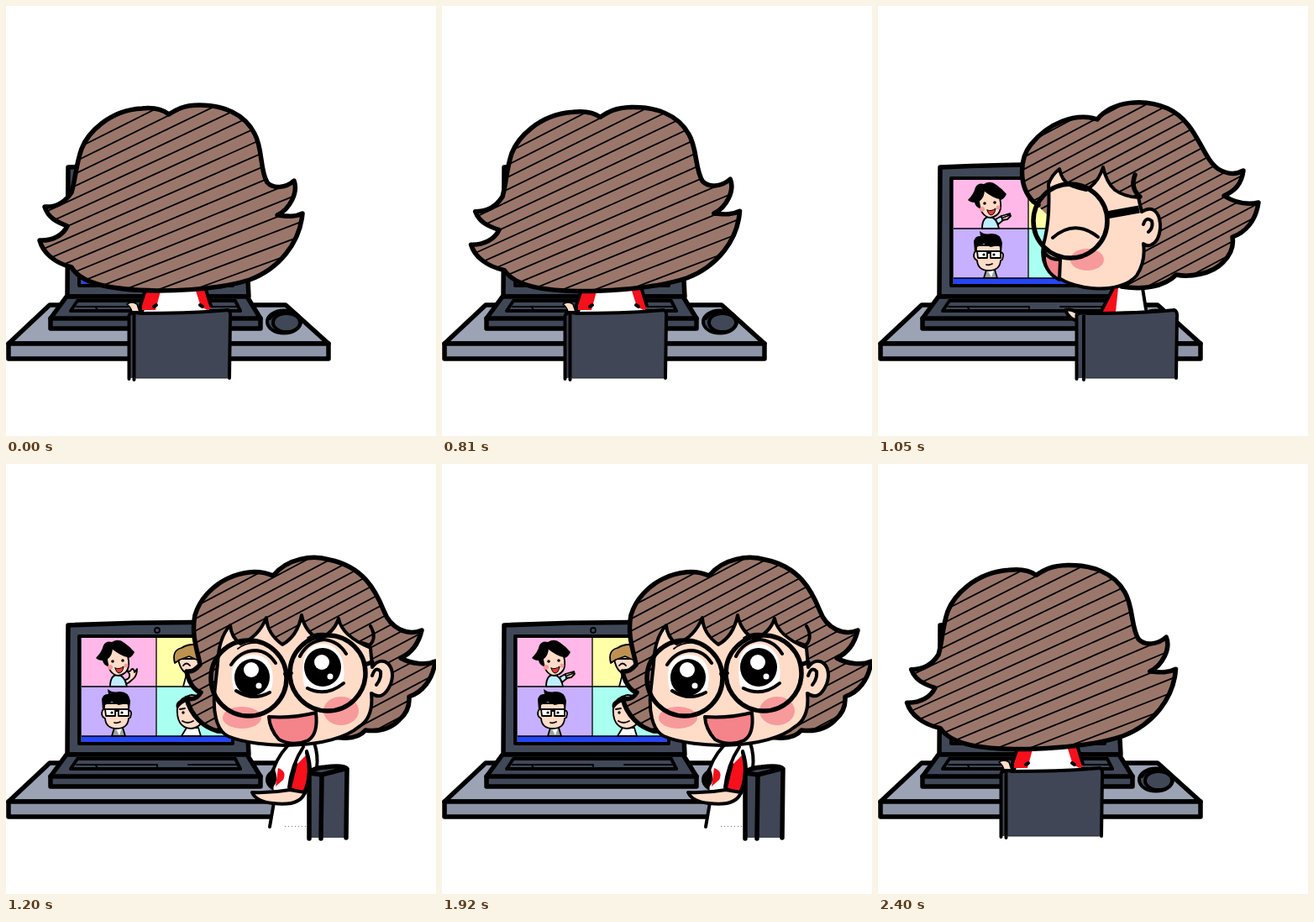
Recreate the animation shown at these times as an HTML page. Size 512 by 512 pixels, loop 2.49 s.

```html
<!DOCTYPE html>
<html lang="en">
<head>
<meta charset="utf-8">
<title>Video call</title>
<style>
html, body { margin: 0; width: 100%; height: 100%; overflow: hidden; background: #fff; }
svg { display: block; width: 100vw; height: 100vh; }
.ink { stroke: #000; stroke-width: 5.5; stroke-linejoin: round; stroke-linecap: round; }
.mid { stroke-width: 4; }
.thin { stroke-width: 1.8; }
.none { fill: none; }
.dark { fill: #404656; }
.steel { fill: #404858; }
.skin { fill: #ffdcc8; }
.hair { fill: #9b776b; }
.white { fill: #fff; }
.red { fill: #f5101c; }
.blush { fill: #f79a9c; }
.lips { fill: #f5848a; }
</style>
</head>
<body>
<svg viewBox="0 0 512 512" xmlns="http://www.w3.org/2000/svg">
<defs>
  <path id="backHair" d="M194 129C185 122 172 121 162 122C122 124 97 152 90 170C83 190 83 205 78 222C70 234 60 240 46 239C50 252 60 257 73 262C68 273 55 280 40 279C44 294 58 306 78 311C88 328 115 338 180 339C230 339 268 333 290 326C325 313 350 282 353 247C343 252 333 250 323 249C338 242 348 222 343 208C333 217 318 218 311 210C302 195 306 170 296 152C284 128 258 118 230 118C212 118 203 123 194 129Z"/>
  <path id="sideHair" d="M261 135C235 126 202 140 182 165C168 182 167 215 185 233L203 250L290 334C315 338 340 335 355 320C370 323 397 320 411 305C420 296 424 286 422 275C437 270 450 256 453 234C440 237 425 234 412 226C425 220 433 212 435 196C426 201 415 200 405 194C385 180 380 138 345 122C318 110 280 112 261 135Z"/>
  <path id="frontHair" d="M318 133C285 118 236 142 225 180C220 205 229 225 231 239C226 245 221 248 215 247C218 262 225 270 232 272C228 279 222 281 215 279C220 300 236 314 252 318L400 326C412 327 422 324 428 317C444 319 458 315 468 305C475 299 481 290 480 277C495 272 508 258 511 235C500 240 482 238 470 231C483 225 491 215 495 198C478 205 458 196 450 175C440 150 425 122 385 114C365 108 335 112 318 133Z"/>
</defs>

<!-- desk -->
<g class="ink">
  <path d="M52 356H333L384 402H3Z" fill="#9ba3b4"/>
  <path d="M3 402H384V420H3Z" fill="#8c94a6"/>
</g>

<!-- laptop -->
<g class="ink steel">
  <path d="M74 192Q178 187 281 189L289 346H73Z"/>
  <path d="M72 346H287L303 372V384H53V372Z"/>
  <path class="none" d="M53 372H303"/>
  <path class="mid" d="M85 351H273L279 363H77Z"/>
  <path class="thin" d="M107 359L110 363M180 359V363M84 358H180M217 358H274"/>
  <circle class="thin" cx="180" cy="198" r="3"/>
</g>
<g>
  <path class="ink mid steel" d="M87 205H270V333H87Z"/>
  <path d="M90 207H179V265H90Z" fill="#ffb8e8"/>
  <path d="M179 207H268V265H179Z" fill="#ffffa8"/>
  <path d="M90 265H179V324H90Z" fill="#c7b0ff"/>
  <path d="M179 265H268V324H179Z" fill="#a9fff0"/>
  <path d="M90 324H268V331H90Z" fill="#2546f5"/>
  <path d="M179 207V324M90 265H268M90 324H268" stroke="#000" stroke-width="1.3"/>
</g>

<!-- callers -->
<g id="waver">
  <path class="ink thin" fill="#bfeeff" d="M124 265Q124 252 132 251Q141 251 144 265Z"/>
  <path d="M107 231Q114 224 116 216Q119 210 126 212Q134 207 141 213Q147 217 153 224Q150 230 146 231L143 241H121Q116 239 115 234Q110 234 107 231Z"/>
  <path class="ink skin thin" d="M120 232Q126 228 126 219Q139 229 145 229Q150 249 134 252Q122 251 120 232Z"/>
  <circle cx="127" cy="235" r="1.8"/><circle cx="139" cy="234" r="1.8"/>
  <circle class="blush" cx="124" cy="242" r="3"/><circle class="blush" cx="143" cy="240" r="2.5"/>
  <path class="ink" style="stroke-width:1" fill="#e43b42" d="M130 243Q135 245 140 241Q139 249 134 249Q131 248 130 243Z"/>
</g>
<g id="handUp" class="ink thin skin">
  <path d="M142 257Q148 256 147 250L144 246Q148 248 149 245Q152 242 153 248L156 244Q156 253 150 257Q146 261 143 262Z"/>
</g>
<g id="handDown" class="ink thin">
  <path fill="#bfeeff" d="M140 254L147 250L149 255L143 260Z"/>
  <path class="skin" d="M147 250L157 247L158 250L154 254L148 255Z"/>
  <path class="none" d="M149 252L157 249"/>
</g>
<g id="boss">
  <path class="ink thin" fill="#9ba3a0" d="M126 324L129 314H139L142 324Z"/>
  <path class="white" d="M130 314H138L135 323Z"/>
  <path class="ink thin skin" d="M117 285H146V293Q151 294 148 302L146 303Q145 315 132 315Q119 315 118 303Q112 300 115 293L117 292Z"/>
  <path d="M115 293L114 280Q116 273 122 274L121 268Q127 273 134 271Q146 270 148 282L147 293L144 285L134 287L126 283L118 287Z"/>
  <g class="ink thin white"><path d="M118 292H130V300H119ZM134 292H146V300H134ZM130 294H134"/></g>
  <path class="ink thin none" d="M118 292H146M129 308Q132 309 136 307"/>
  <circle cx="126" cy="296" r="1.6"/><circle cx="138" cy="296" r="1.6"/>
</g>
<g id="blond">
  <path class="ink thin white" d="M211 265L215 250H234L236 265Z"/>
  <path class="ink thin skin" d="M205 232H242Q241 251 224 252Q208 251 205 232Z"/>
  <path class="ink thin" fill="#bd9250" d="M201 237Q197 222 209 219Q222 211 235 219Q244 224 242 237L235 231L227 233L218 229L207 233Z"/>
  <path class="ink thin none" d="M211 240Q215 235 219 240M229 239Q233 235 237 239M218 245Q224 250 230 244"/>
</g>
<g id="bald">
  <path class="ink thin white" d="M209 324L215 314H229L232 324Z"/>
  <path class="ink thin skin" d="M204 288Q207 278 221 275Q238 276 238 294Q235 314 220 315Q202 314 204 288Z"/>
  <path d="M204 293Q199 283 211 280L219 274L215 283Q207 286 204 293Z"/>
  <path class="ink thin none" d="M207 292L213 291M210 306Q216 310 223 306"/>
  <circle cx="211" cy="296" r="1.7"/><circle cx="225" cy="295" r="1.7"/>
</g>

<!-- mouse -->
<g class="ink mid steel">
  <ellipse cx="331" cy="376" rx="20" ry="13.5"/>
  <ellipse cx="334" cy="377" rx="16" ry="11"/>
  <path class="none" d="M314 372Q321 362 331 366"/>
</g>

<!-- seen from behind -->
<g id="back">
  <g id="backBody">
    <path class="white" d="M177 336H233L243 366H163Z"/>
    <path class="red" d="M166 336H185L178 362H160Z M225 336H239L245 359L240 362L232 358Z"/>
    <path class="ink mid none" d="M166 338L160 356V362M238 338L244 357M179 356L176 358M231 356L234 358"/>
    <path id="typing" class="ink skin" style="stroke-width:1.6" d="M144 355Q150 351 156 355L159 364H150Q149 359 144 355Z"/>
    <path class="dark" d="M147 366L266 363V443H147Z"/>
    <path class="ink mid none" d="M146.500 444V369Q148 363 160 366Q220 366 264 362Q268 363 267 372L266 443M152.500 445V368"/>
    <path d="M152 443H265" stroke="#222" stroke-width="1"/>
  </g>
  <g id="backHead">
    <use href="#backHair" class="hair"/>
    <g class="hatch" data-hair="backHair" data-rule="194,.51,99,15.6,.009"></g>
    <use href="#backHair" class="ink none"/>
  </g>
</g>

<!-- seen from the side -->
<g id="side">
  <path class="white" d="M283 330H316L321 370H262Z"/>
  <path class="red" d="M279 336H286L283 364H266Z"/>
  <path class="ink mid none" d="M280 336L266 363M315 336L319 361"/>
  <path class="ink mid skin" d="M223 362Q231 360 238 366L239 375Q228 374 223 362Z"/>
  <path class="dark" d="M238 367L356 363V443H238Z"/>
  <path class="ink mid none" d="M236.500 444V368Q240 364 250 366Q310 366 353 362Q357 364 356 372L355 443M245 445V369"/>
  <path d="M244 443H354" stroke="#222" stroke-width="1"/>
  <use href="#sideHair" class="hair"/>
  <g class="hatch" data-hair="sideHair" data-rule="300,.53,-90,14.5,0"></g>
  <path class="ink none" d="M261 135C235 126 202 140 182 165C168 182 167 215 185 233L191 237M290 334C315 338 340 335 355 320C370 323 397 320 411 305C420 296 424 286 422 275C437 270 450 256 453 234C440 237 425 234 412 226C425 220 433 212 435 196C426 201 415 200 405 194C385 180 380 138 345 122C318 110 280 112 261 135"/>
  <path class="ink mid skin" d="M203 212Q207 201 216 194Q219 208 228 213Q240 218 248 219Q262 211 268 192Q272 210 282 219Q293 227 310 228L314 245C337 230 342 270 329 282Q322 288 316 283Q319 304 308 321C288 344 235 339 213 322C196 314 193 295 199 276Q205 250 203 212Z"/>
  <path class="ink none" d="M306 201Q300 217 312 227"/>
  <path class="ink mid none" d="M316 260Q319 250 326 256Q328 264 322 269"/>
  <path class="ink mid lips" d="M198 293Q203 302 217 302L216 326Q196 316 198 293Z"/>
  <ellipse class="blush" cx="249" cy="302" rx="20" ry="13"/>
  <circle class="ink none" cx="229" cy="256" r="44"/>
  <path d="M272 249L311 242" stroke="#000" stroke-width="9"/>
  <path class="ink mid none" d="M208 276Q234 253 262 275"/>
</g>

<!-- facing us -->
<g id="front">
  <path class="white" d="M334 335L367 331Q374 352 366 373L362 432H314L319 400L318 370Q322 350 334 335Z"/>
  <path class="ink mid none" d="M335 336Q320 352 316 373M367 332Q372 347 370 362M319 403L314 432"/>
  <path class="red" d="M324 362Q335 366 330 376L321 384Z"/>
  <path class="ink mid" d="M318 364Q312 374 317 383Q323 376 318 364Z"/>
  <path class="ink mid white" d="M354 337Q340 358 337 385L356 392Q367 369 358 342"/>
  <path class="red" d="M346 358L358 346Q364 370 355 391L339 385Z"/>
  <path class="ink mid none" d="M345 357L338 385M358 344Q365 370 355 391"/>
  <path class="ink mid skin" d="M338 388Q315 392 293 391Q298 402 318 404Q350 408 356 391Z"/>
  <path d="M332 431.5H362" stroke="#777" stroke-dasharray="1 3"/>
  <g class="ink dark">
    <path stroke="none" d="M361 368L380 361L405 361V445H361Z"/>
    <path class="none" d="M361 446V370Q363 362 380 361Q402 358 406 363L405 445M362 368L376 370L403 363M376 370L375 446"/>
  </g>
  <g id="frontHead">
    <use href="#frontHair" class="hair"/>
    <g class="hatch" data-hair="frontHair" data-rule="360,.53,-90,14.5,0"></g>
    <use href="#frontHair" class="ink none"/>
    <path class="ink mid skin" d="M252 238Q253 207 267 192Q268 206 279 214Q300 207 310 183Q311 202 329 215Q347 205 352 180Q356 200 372 208Q390 202 396 184Q400 205 434 219L436 242C448 225 466 240 458 262Q449 283 435 273Q438 302 420 313C388 340 302 340 264 324C249 316 247 292 248 275Z"/>
    <path class="ink mid none" d="M434 193Q442 207 433 216L424 213M436 252Q440 240 446 247Q447 256 441 263"/>
    <ellipse class="blush" cx="281" cy="302" rx="23" ry="13"/>
    <ellipse class="blush" cx="399" cy="294" rx="21" ry="17"/>
    <g id="eyes">
      <path class="white" d="M271 268C264 240 276 228 294 227C316 227 322 250 315 271Q293 281 271 268ZM355 264C349 232 358 214 378 214C399 216 406 238 401 262Q380 277 355 264Z"/>
      <ellipse cx="293" cy="254" rx="21" ry="22"/><ellipse cx="377" cy="242" rx="22" ry="23"/>
      <circle class="white" cx="292" cy="245" r="9"/><circle class="white" cx="376" cy="236" r="9"/>
      <circle class="white" cx="301" cy="264" r="3.5"/><circle class="white" cx="386" cy="253" r="3.5"/>
      <path class="ink mid none" d="M274 270Q294 283 314 272M359 267Q381 278 402 261M268 239Q279 222 298 222Q312 223 321 237M350 229Q359 211 379 209Q396 211 405 226"/>
      <path class="ink thin none" d="M276 220Q288 210 307 214M359 207Q374 197 394 206"/>
    </g>
    <g class="ink none"><circle cx="289" cy="255" r="45"/><circle cx="383" cy="249" r="45"/><path d="M333 250Q336 245 339 249M427 239L436 236"/></g>
    <path class="ink mid lips" d="M313 301Q342 303 369 296Q372 321 360 329Q342 337 325 328Q314 316 313 301Z"/>
  </g>
</g>
</svg>
<script>
const LOOP = 2490;
const $ = id => document.getElementById(id);

// Slanted hair strokes, clipped to the hair; each is flatter than the last by `bend`
document.querySelectorAll('.hatch').forEach(g => {
  const hair = g.dataset.hair;
  const [pivot, slope, top, step, bend] = g.dataset.rule.split(',').map(Number);
  let d = '';
  for (let i = 0; i < 40; i++) {
    const y = top + i * step;
    const k = slope - bend * i;
    d += `M0 ${y + k * pivot}L512 ${y - k * (512 - pivot)}`;
  }
  g.innerHTML = `<clipPath id="${hair}Clip"><use href="#${hair}"/></clipPath>
    <path d="${d}" stroke="#000" stroke-width="1.8" clip-path="url(#${hair}Clip)"/>`;
});

// Each pose: start, view, shift, then the head's tilt, width and height
const POSES = [
  [0, 'back', 0, 0, 1, 1],
  [810, 'back', 0, -1.5, 1.025, .985],
  [900, 'back', 18, 0, 1, 1],
  [990, 'back', 50, -.8, 1, 1],
  [1050, 'side', 0, 0, 1, 1],
  [1140, 'front', 0, 0, 1, .985],
  [1200, 'front', 0, 0, 1, 1],
  [2130, 'front', 0, 0, 1, 1.03],
  [2220, 'side', 0, 0, 1, 1],
  [2310, 'back', 50, -.8, 1, 1],
  [2400, 'back', 0, -1.5, 1.025, .985]
];
const STARTS = POSES.map(p => p[0]);
const TYPING = [180, 270, 360, 450, 570, 660];
const CHAT = [1380, 1440, 1500, 1560, 1620, 1710, 1770, 1830];

const count = (times, t) => times.filter(s => s <= t).length;
const show = (id, on) => $(id).setAttribute('display', on ? 'inline' : 'none');
const move = (id, x, y) => $(id).setAttribute('transform', `translate(${x} ${y})`);
const bendHead = (id, x, y, dx, tilt, sx, sy) => $(id).setAttribute('transform',
  `translate(${x + dx} ${y}) rotate(${tilt}) scale(${sx} ${sy}) translate(${-x} ${-y})`);

function draw(t) {
  const [, view, dx, ...shape] = POSES[count(STARTS, t) - 1];
  ['back', 'side', 'front'].forEach(v => show(v, v === view));
  bendHead('backHead', 197, 340, dx, ...shape);
  bendHead('frontHead', 350, 335, dx, ...shape);
  move('backBody', dx, 0);

  const tap = count(TYPING, t) % 2;
  move('typing', -tap, tap);

  const nod = count(CHAT, t) % 2;
  ['waver', 'boss', 'blond'].forEach(id => move(id, 0, nod));
  move('bald', nod, 0);
  const down = t < 1200 || t >= 1920 || nod === 1;
  show('handDown', down);
  show('handUp', !down);
}

function tick(now) {
  draw(now % LOOP);
  requestAnimationFrame(tick);
}
draw(0);
requestAnimationFrame(tick);
</script>
</body>
</html>
```
